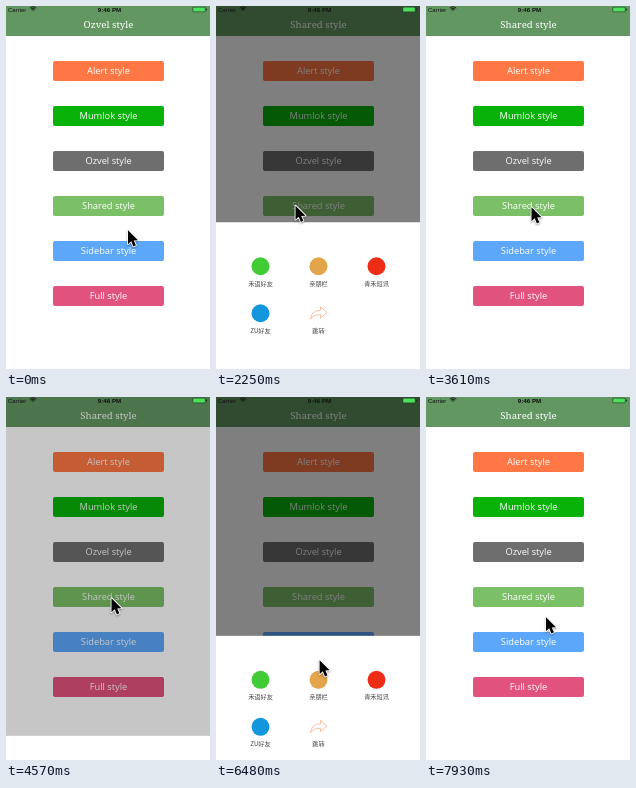
An HTML page with a canvas that plays this animation: 204 by 363 pixels, repeating every 7990 ms.

```html
<!DOCTYPE html>
<html lang="en">
<head>
<meta charset="utf-8">
<title>Popup styles</title>
<style>
html, body { margin: 0; width: 100%; height: 100%; overflow: hidden; background: #fff; }
canvas { display: block; width: 204px; height: 363px; }
</style>
</head>
<body>
<canvas id="stage"></canvas>
<script>
const W = 204, H = 363, LOOP = 7990;
const SHEET_TOP = 216, SHEET_H = H - SHEET_TOP;
const HIDDEN_TOP = H + SHEET_H / 2;
const TRAVEL = HIDDEN_TOP - SHEET_TOP;
const OPEN = [1592, 4490], CLOSE = [3356, 7150], CLOSE_MS = 250;
const DRAG = { from: 6030, to: 6770, dist: 48 };

const BUTTONS = [
  ['Alert style', '#ff7744'],
  ['Mumlok style', '#08b209'],
  ['Ozvel style', '#6e6e6e'],
  ['Shared style', '#7bbf66'],
  ['Sidebar style', '#5ca7fa'],
  ['Full style', '#e2527e']
];
const SHARES = [
  ['禾语好友', '#41cc35', 44.5, 44],
  ['亲朋栏', '#e3a54c', 102.5, 44],
  ['青禾短讯', '#ee2d16', 160.5, 44],
  ['ZU好友', '#1396db', 44.5, 91],
  ['跳转', null, 102.5, 91]
];
// Pointer stops: time, x, y
const POINTER = [
  [10, 121, 223], [740, 68, 200],
  [990, 68, 200], [1260, 78.5, 198.5],
  [2260, 78.5, 198.5], [2720, 103.5, 199.5], [2900, 104.5, 200],
  [4980, 104.5, 200], [5310, 110, 216], [5540, 105, 234],
  [DRAG.from, 105, 234], [DRAG.to, 100, 293],
  [7140, 100, 293], [7930, 119, 219]
];

const dpr = Math.max(1, window.devicePixelRatio || 1);
const stage = document.getElementById('stage');
const layer = document.createElement('canvas');
const [ctx, pop] = [stage, layer].map(c => {
  c.width = W * dpr;
  c.height = H * dpr;
  const g = c.getContext('2d');
  g.scale(dpr, dpr);
  return g;
});

const clamp = v => Math.min(1, Math.max(0, v));
const smooth = v => { v = clamp(v); return v * v * (3 - 2 * v); };

function spring(ms) {
  const t = ms / 1000, decay = 9.2, freq = 12.27;
  return 1 - Math.exp(-decay * t) * (Math.cos(freq * t) + decay / freq * Math.sin(freq * t));
}

function dragged(t) {
  return Math.pow(clamp((t - DRAG.from) / (DRAG.to - DRAG.from)), 1.5);
}

// Sheet position and group opacity, or null while hidden
function sheetAt(t) {
  const i = t < OPEN[1] ? 0 : 1;
  if (t < OPEN[i] || t >= CLOSE[i] + CLOSE_MS) return null;
  const rest = SHEET_TOP + (i ? DRAG.dist * dragged(t) : 0);
  if (t >= CLOSE[i]) {
    const p = smooth((t - CLOSE[i]) / CLOSE_MS);
    return { top: rest + (HIDDEN_TOP - rest) * p, alpha: 1 - p };
  }
  const p = t - OPEN[i] < 780 ? spring(t - OPEN[i]) : 1;
  return { top: rest + TRAVEL * (1 - p), alpha: clamp(p) };
}

function pointerAt(t) {
  const k = POINTER.findIndex(s => s[0] > t);
  if (k === 0) return POINTER[0].slice(1);
  if (k < 0) return POINTER[POINTER.length - 1].slice(1);
  const [t0, x0, y0] = POINTER[k - 1], [t1, x1, y1] = POINTER[k];
  const p = t0 === DRAG.from ? dragged(t) : smooth((t - t0) / (t1 - t0));
  return [x0 + (x1 - x0) * p, y0 + (y1 - y0) * p];
}

function text(g, str, x, y, font, color, align = 'center') {
  g.font = font;
  g.fillStyle = color;
  g.textAlign = align;
  g.textBaseline = 'alphabetic';
  g.fillText(str, x, y);
}

function box(g, x, y, w, h, r, color) {
  g.fillStyle = color;
  g.beginPath();
  g.roundRect(x, y, w, h, r);
  g.fill();
}

function drawPage(title) {
  ctx.fillStyle = '#fff';
  ctx.fillRect(0, 0, W, H);
  ctx.fillStyle = '#629762';
  ctx.fillRect(0, 0, W, 30);
  text(ctx, title, 102.5, 22, '500 9.7px "Noto Serif", serif', '#fff');
  BUTTONS.forEach(([label, color], i) => {
    const y = 55 + i * 45;
    box(ctx, 47, y, 111, 20, 2, color);
    text(ctx, label, 102.5, y + 12.6, '9.3px "Open Sans", "Noto Sans", sans-serif', '#fff');
  });
}

function drawStatus() {
  text(ctx, 'Carrier', 2, 5.5, '6px "Liberation Sans", sans-serif', '#111', 'left');
  text(ctx, '9:46 PM', 103.5, 5.5, 'bold 6.2px "Liberation Sans", sans-serif', '#111');
  ctx.strokeStyle = '#111';
  ctx.lineWidth = 0.9;
  for (const r of [1.6, 3.1, 4.6]) {
    ctx.beginPath();
    ctx.arc(27, 5.4, r, -Math.PI * 0.75, -Math.PI * 0.25);
    ctx.stroke();
  }
  box(ctx, 186.5, 0.7, 13, 5.6, 1.2, '#2c4a2e');
  box(ctx, 187.2, 1.4, 11.6, 4.2, 0.7, '#4be35c');
  box(ctx, 200, 2.5, 1, 2, 0.4, '#222');
}

function drawArrow(g, x, y) {
  g.strokeStyle = '#f5b08e';
  g.lineWidth = 0.8;
  g.lineJoin = 'round';
  g.beginPath();
  g.moveTo(x - 8, y + 6);
  g.quadraticCurveTo(x - 7, y - 3, x + 2, y - 3);
  g.lineTo(x + 2, y - 6.5);
  g.lineTo(x + 8.5, y - 0.7);
  g.lineTo(x + 2, y + 4.8);
  g.lineTo(x + 2, y + 1.5);
  g.quadraticCurveTo(x - 5, y + 1, x - 8, y + 6);
  g.stroke();
}

function drawPopup({ top, alpha }) {
  pop.clearRect(0, 0, W, H);
  pop.fillStyle = 'rgba(0,0,0,.5)';
  pop.fillRect(0, 0, W, H);
  pop.fillStyle = '#fff';
  pop.fillRect(0, top, W, SHEET_H);
  for (const [label, color, x, dy] of SHARES) {
    const y = top + dy;
    if (color) {
      pop.fillStyle = color;
      pop.beginPath();
      pop.arc(x, y, 9, 0, Math.PI * 2);
      pop.fill();
    } else {
      drawArrow(pop, x, y);
    }
    text(pop, label, x, y + 19.4, '6.2px "Noto Sans CJK SC", "Noto Sans CJK", sans-serif', '#444');
  }
  ctx.globalAlpha = alpha;
  ctx.drawImage(layer, 0, 0, W, H);
  ctx.globalAlpha = 1;
}

function drawPointer(x, y) {
  ctx.save();
  ctx.translate(x + 1, y + 1.2);
  ctx.beginPath();
  [[0, 0], [0, 14], [3.2, 11.1], [5.4, 16.2], [7.9, 15.1], [5.7, 10.2], [10, 10]]
    .forEach(p => ctx.lineTo(...p));
  ctx.closePath();
  ctx.lineJoin = 'round';
  ctx.lineWidth = 1.8;
  ctx.strokeStyle = '#fff';
  ctx.shadowColor = 'rgba(0,0,0,.35)';
  ctx.shadowBlur = 2 * dpr;
  ctx.shadowOffsetY = dpr;
  ctx.stroke();
  ctx.shadowColor = 'transparent';
  ctx.fillStyle = '#000';
  ctx.fill();
  ctx.restore();
}

function render(t) {
  drawPage(t < 1500 ? 'Ozvel style' : 'Shared style');
  const sheet = sheetAt(t);
  if (sheet) drawPopup(sheet);
  drawStatus();
  drawPointer(...pointerAt(t));
}

const start = performance.now();
function tick() {
  render((performance.now() - start) % LOOP);
  requestAnimationFrame(tick);
}
tick();
</script>
</body>
</html>
```
